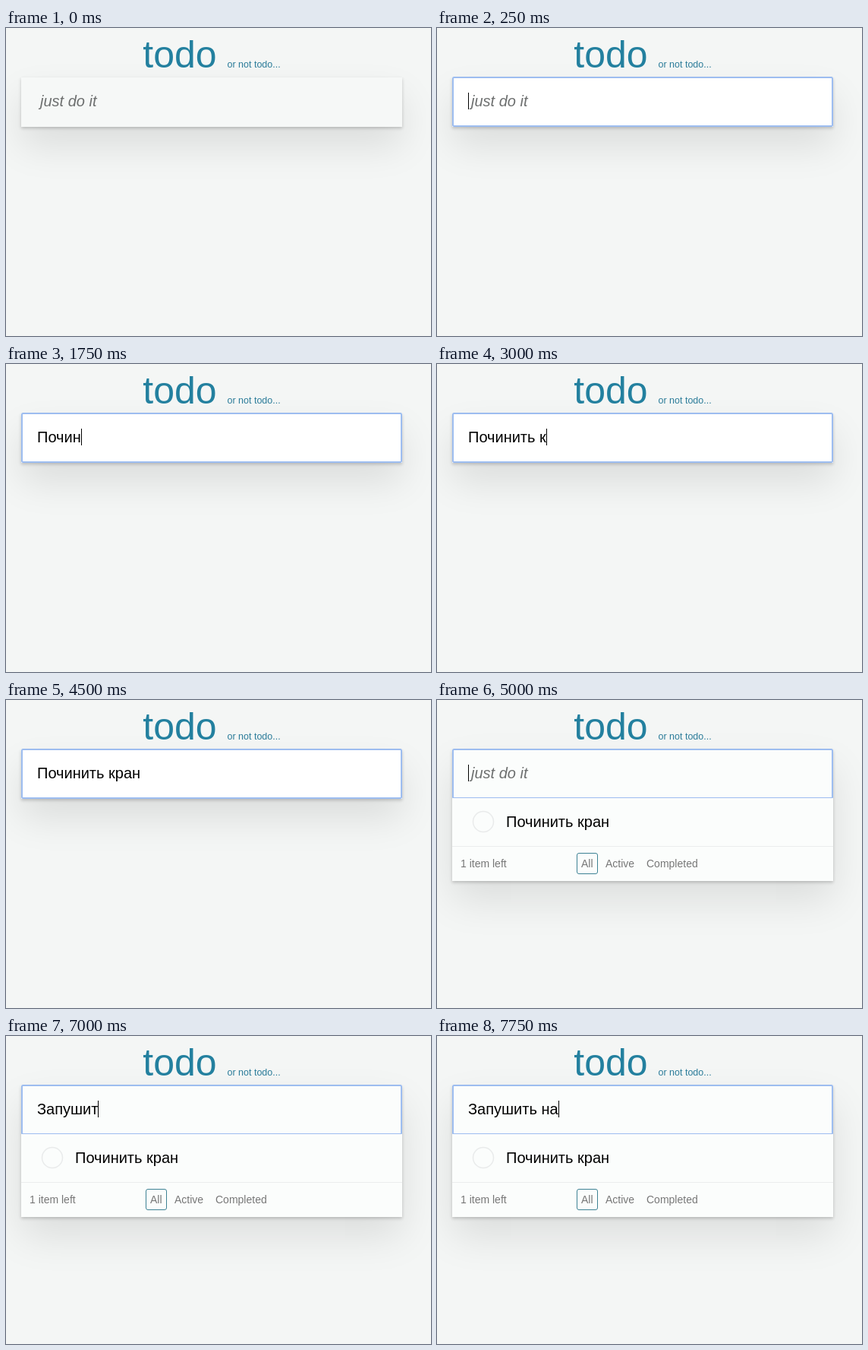
Recreate the animation shown at these times as an HTML page. Size 560x405 px, loop 8000 ms.

```html
<!DOCTYPE html>
<html lang="ru">
<head>
<meta charset="utf-8">
<style>
  html, body { margin: 0; width: 100%; height: 100%; overflow: hidden; background: #f4f6f5; }
  #card {
    position: absolute; left: 20px; top: 65px; width: 502px;
    box-shadow: 0 2px 4px rgba(0, 0, 0, .2), 0 25px 50px rgba(0, 0, 0, .1);
  }
  svg { position: absolute; left: 0; top: 0; }
  text { font: 20px "Liberation Sans", Arial, sans-serif; white-space: pre; }
  .title { font-size: 50px; fill: #23809f; }
  .subtitle { font-size: 12.5px; fill: #2a7b99; }
  #hint { font-style: italic; fill: #6d6f6f; }
  .footer text { font-size: 14px; fill: #777; }
</style>
</head>
<body>
<div id="card"></div>
<svg width="560" height="405">
  <text class="title" x="180.3" y="52">todo</text>
  <text class="subtitle" x="291.5" y="52">or not todo...</text>
  <rect id="ring" x="21" y="65" width="500" height="64" rx="1.5" fill="none" stroke="#9dbdf0" stroke-width="2"/>
  <text id="hint" x="45" y="103">just do it</text>
  <text id="entry" x="41" y="103"></text>
  <rect id="caret" y="85" width="1" height="22"/>
  <g id="list">
    <rect x="20" y="129" width="502" height="109" fill="#fbfdfc"/>
    <circle cx="61" cy="160" r="13.5" fill="none" stroke="#e9ebeb" stroke-width="1.5"/>
    <text x="91" y="167">Починить кран</text>
    <rect x="20" y="192" width="502" height="1" fill="#ebeded"/>
    <g class="footer">
      <text x="31" y="220">1 item left</text>
      <rect x="184.5" y="201.5" width="27" height="27" rx="2.5" fill="none" stroke="#3d8294"/>
      <text x="190" y="220">All</text>
      <text x="222" y="220">Active</text>
      <text x="276" y="220">Completed</text>
    </g>
  </g>
</svg>
<script>
  // The picture advances in ticks of 250 ms; all times below count ticks.
  const TICK = 250, LOOP = 32, FOCUS = 1, SUBMIT = 20, BLINK = 2;

  // Letters come at a steady rate after the start, except in one-tick pauses.
  const first = { text: "Починить кран", start: 3, rate: 1.25, pauses: [8, 14] };
  const second = { text: "Запушить на", start: 21, rate: 1.1, pauses: [] };

  const el = id => document.getElementById(id);
  const show = (id, visible) => { el(id).style.display = visible ? "" : "none"; };

  function typedAt(tick) {
    const { text, start, rate, pauses } = tick < SUBMIT ? first : second;
    const rests = pauses.filter(pause => pause <= tick).length;
    return text.slice(0, Math.max(0, Math.floor((tick - start - rests) * rate)));
  }

  function draw(tick) {
    const focused = tick >= FOCUS, submitted = tick >= SUBMIT;
    const typed = typedAt(tick);

    el("card").style.height = (submitted ? 173 : 65) + "px";
    el("card").style.background = submitted ? "#fbfdfc" : focused ? "#fff" : "#f6f8f7";
    show("list", submitted);
    show("ring", focused);
    show("hint", !typed);

    el("entry").textContent = typed;
    const width = typed ? el("entry").getComputedTextLength() : 0;
    el("caret").setAttribute("x", Math.round(41 + width));

    // The caret blinks off once nothing has happened for a while.
    const idle = tick - BLINK >= FOCUS && typedAt(tick - BLINK) === typed;
    show("caret", focused && !idle);
  }

  let start;
  function frame(now) {
    start ??= now;
    draw(Math.floor((now - start) / TICK) % LOOP);
    requestAnimationFrame(frame);
  }
  draw(0);
  requestAnimationFrame(frame);
</script>
</body>
</html>
```
